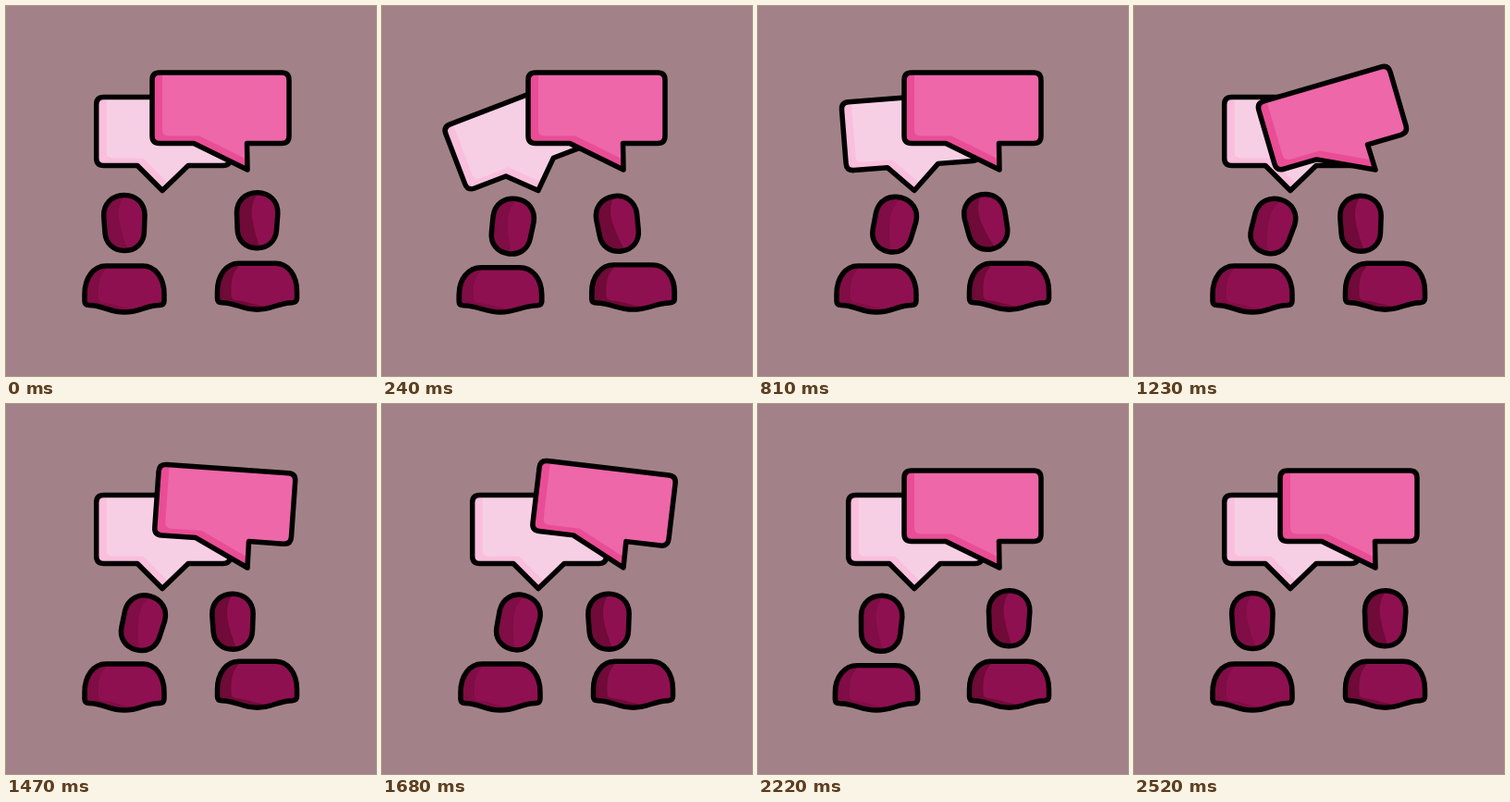
An HTML page for the animation above (4550 ms loop, 400x400 px).

```html
<!DOCTYPE html>
<html lang="en">
<head>
<meta charset="utf-8">
<title>Conversation</title>
<style>
  html, body { margin: 0; width: 100%; height: 100%; overflow: hidden; background: #a28288; }
  svg { display: block; width: 100%; height: 100%; }
  .line { fill: none; stroke: #000; stroke-width: 5.5; stroke-linejoin: round; }
</style>
</head>
<body>
<svg id="stage" viewBox="0 0 400 400"></svg>
<script>
const LOOP = 4550, TURN = 1080;
const stage = document.getElementById('stage');

// A shaded base, a lighter part clipped to the shape, and the outline
function part(id, shape, light, dark, fill) {
  stage.insertAdjacentHTML('beforeend', `<g id="${id}">
    <clipPath id="${id}Clip"><path d="${shape}"/></clipPath>
    <path d="${shape}" fill="${dark}"/>
    <path d="${light}" fill="${fill}" clip-path="url(#${id}Clip)"/>
    <path d="${shape}" class="line"/></g>`);
}

// Rounded box whose tail runs from the right root over the tip to the left root
function bubble(id, l, t, r, b, [root1, tipX, tipY, root2], dark, fill) {
  const shape = `M${l + 8} ${t}H${r - 8}q8 0 8 8V${b - 8}q0 8 -8 8H${root1}
    L${tipX} ${tipY}L${root2} ${b}H${l + 8}q-8 0 -8 -8V${t + 8}q0 -8 8 -8Z`;
  const light = `M${l + 11} ${t - 5}V${b - 15}q0 7 7 7H${root2 + 6}
    L${tipX + 6} ${tipY - 8}L${r + 5} ${b + 5}V${t - 5}Z`;
  part(id, shape, light, dark, fill);
}

const HEAD = 'M0 -30C13 -30 22.2 -21 22.2 -8L21.2 10C20.700 22 12 30 0 30S-20.700 22 -21.200 10L-22.200 -8C-22.200 -21 -13 -30 0 -30Z';
const HEAD_LIGHT = 'M30 -32H3Q-9 -20 -5 0T5 32H30Z';
const BODY = 'M-43 -20C-43 -38 -33 -50.500 -20 -50.500H20C33 -50.500 43 -38 43 -20V-12.500q0 4.500 -5 4.500C22 -7.500 16 -.500 0 -.500S-22 -7.500 -38 -8q-5 0 -5 -4.500Z';
const BODY_LIGHT = 'M50 -54H-10Q-28 -46 -28 -24V-16q0 5 6 5.500C-9 -10 -3 -4 14 -4L50 4Z';

const people = [
  { id: 'L', dark: '#800d45', x: 128, headY: 234.5, bodyY: 331.5, tilt: -1, leaves: 1990,
    lean: [19, 1.5, 14.5], nod: [3, 2, 4], nodEnd: 1280 },
  { id: 'R', dark: '#700a38', x: 271.5, headY: 231.7, bodyY: 328.7, tilt: 1, leaves: 1790,
    lean: [-24.7, 1.5, -14], nod: [-1.7, 2, 12], nodEnd: 1790 }
];

bubble('first', 97.7, 98.5, 242.5, 172.5, [197, 169, 199.5, 142], '#f9bfdc', '#f7cfe5');
bubble('second', 158, 72, 306, 148.5, [260.5, 261, 177, 203], '#e94d95', '#ed67a9');
for (const { id, dark } of people) {
  part('head' + id, HEAD, HEAD_LIGHT, dark, '#8f1050');
  part('body' + id, BODY, BODY_LIGHT, dark, '#8f1050');
}

function ramp(t, from, to) {
  const p = Math.min(1, Math.max(0, (t - from) / (to - from)));
  return p * p * p * (p * (6 * p - 15) + 10);
}

// Wobble that dies away; each step is [time, angle]
const wobble = [[0, 0], [230, -21], [500, 16], [735, -9], [900, 1.5], [1050, 0]];
const swing = t => wobble.slice(1).reduce((sum, [time, angle], i) =>
  sum + (angle - wobble[i][1]) * ramp(t, wobble[i][0], time), 0);

const place = (id, transform) =>
  document.getElementById(id).setAttribute('transform', transform);

function draw(t) {
  place('first', `rotate(${swing(t)} 169 200)`);
  place('second', `rotate(${swing(t - TURN)} 261 177)`);
  for (const p of people) {
    const lean = ramp(t, 20, 390) - ramp(t, p.leaves, p.leaves + 370);
    const nod = ramp(t, 730, 1080) - ramp(t, p.nodEnd, p.nodEnd + 330);
    const squash = 4 * lean * (1 - lean);
    const [dx, dy, turn] = p.lean.map((v, i) => v * lean + p.nod[i] * nod);
    place('head' + p.id,
      `translate(${p.x + dx} ${p.headY + dy + 3 * squash}) rotate(${p.tilt + turn})`);
    place('body' + p.id,
      `translate(${p.x} ${p.bodyY}) scale(${1 + 0.045 * squash} ${1 - 0.04 * squash})`);
  }
}

const start = performance.now();
function frame() {
  draw((performance.now() - start) % LOOP);
  requestAnimationFrame(frame);
}
frame();
</script>
</body>
</html>
```
